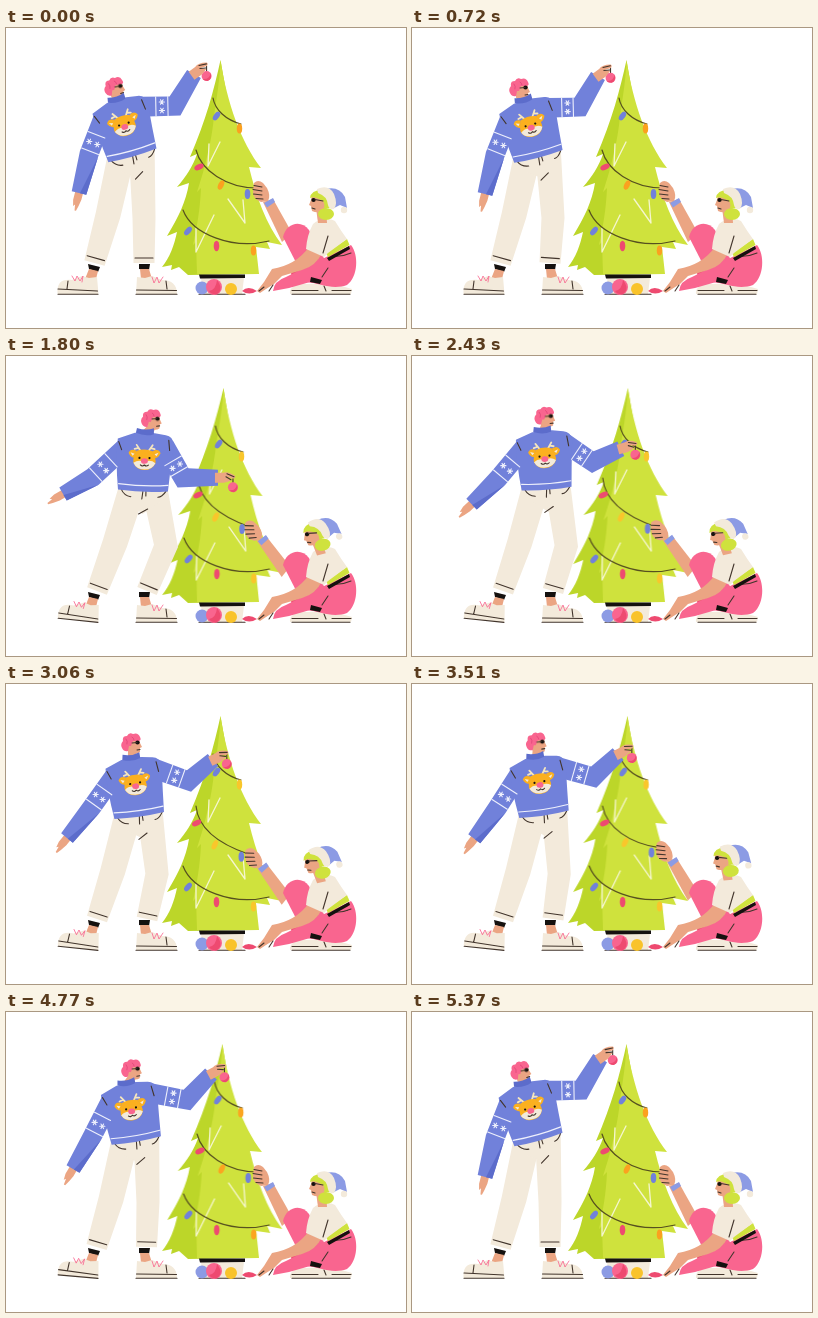
Recreate the animation shown at these times as an HTML page. Size 400 px wide and 300 px high, loop 5400 ms.

```html
<!DOCTYPE html>
<html lang="en">
<head>
<meta charset="utf-8">
<title>Decorating the tree</title>
<style>
  html, body { margin: 0; width: 100%; height: 100%; overflow: hidden; background: #fff; }
  svg { display: block; width: 100%; height: 100%; }
  path, ellipse, circle { stroke-linejoin: round; stroke-linecap: round; }
  .skin { fill: #eba583; }
  .cream { fill: #f3eadb; }
  .blue { fill: #7181da; }
  .sky { fill: #8c9be4; }
  .shade { fill: #5c6ccb; }
  .pink { fill: #f9658f; }
  .lime { fill: #cfe23d; }
  .leaf { fill: #bcd629; }
  .gold { fill: #fbb01f; }
  .red { fill: #ee4a70; }
  .ink { fill: #15110f; }
  .line { fill: none; stroke: #42352c; stroke-width: 1.1; }
  .snow { fill: none; stroke: #eef0fc; stroke-width: 1.1; }
  .wire { fill: none; stroke: #56501f; stroke-width: 1.2; }
  .scribble { fill: none; stroke: #f5f6cf; stroke-width: 1.3; }
  .lace { fill: none; stroke: #f9658f; stroke-width: .8; }

  #tree { transform-origin: 214px 247px; animation: sway 5.4s ease-in-out infinite; }
  @keyframes sway {
    0%, 20%, 56%, 100% { transform: skewX(0); }
    33% { transform: skewX(-.8deg); }
    74%, 90% { transform: skewX(-.5deg); }
  }
  .glow { animation: glow 5.4s linear infinite; }
  @keyframes glow {
    0%, 22%, 90%, 100% { fill: #fba11f; }
    33%, 74% { fill: #f9c62b; }
  }
  #eye { animation: blink 5.4s infinite step-end; }
  @keyframes blink {
    0%, 78% { opacity: 1; }
    72% { opacity: 0; }
  }
</style>
</head>
<body>
<svg viewBox="0 0 400 300">
  <g id="tree">
    <path class="leaf" d="M214.500 32C208 62 200 92 184 129L191 126C187 138 180 149 171 159L183 155C180 174 172 190 161 208L171 204C168 218 164 229 156 239L166 237L165 242L173 239L182 247L252 246Z"/>
    <path class="lime" d="M214.500 32C221 75 235 114 255 140L243 139C250 168 260 196 276 217L261 214L264 221L250 219L253 246H191L190 214L187 217C191 199 194 182 195 160L191 164C199 140 206 112 208 88C211 68 214 50 214.500 32Z"/>
    <path class="scribble" d="M203 116L202 138L214 114M222 171L239 195L237 172M190 200L190 224L208 187"/>
    <path class="wire" d="M207 70C209 82 220 92 235 96M177 182C186 206 226 222 263 213"/>
    <path class="wire" id="string"/>
    <ellipse class="blue" cx="210.500" cy="88" rx="2.800" ry="5" transform="rotate(35 210.500 88)"/>
    <ellipse class="glow" cx="233.500" cy="100.500" rx="2.700" ry="5"/>
    <ellipse class="blue" cx="182" cy="203" rx="2.800" ry="5" transform="rotate(40 182 203)"/>
    <ellipse class="red" cx="210.500" cy="218" rx="2.800" ry="5.200"/>
    <ellipse class="glow" cx="247.500" cy="222.500" rx="2.700" ry="5"/>
    <ellipse class="red" id="bulb0" rx="2.700" ry="5"/>
    <ellipse class="glow" id="bulb1" rx="2.700" ry="5"/>
    <ellipse class="blue" id="bulb2" rx="2.800" ry="5"/>
  </g>

  <path class="cream" d="M195 250H238L236 266H197Z"/>
  <path class="ink" d="M193 246.500H239V250L194 250.500Z"/>
  <path class="line" d="M193 266.300H239"/>
  <circle class="sky" cx="196" cy="260" r="6.500"/>
  <circle class="pink" cx="208" cy="259" r="8"/>
  <path class="red" d="M203 263Q210 262 211 252Q218 261 211 266Q206 267 203 263Z"/>
  <circle cx="225" cy="261" r="6" fill="#f9c32b"/>
  <path class="red" d="M236 263Q242 257 251 263Q243 268 236 263Z"/>

  <g id="woman">
    <g id="backArm">
      <path class="skin" d="M257 174L267 171L286 205L276 214Z"/>
      <path class="skin" d="M248 155Q252 151 257 155L261 160Q265 168 262 173L255 174Q247 171 247 164Z"/>
      <path class="line" d="M248 157.500L256 159M247 161.500L256 163M247.500 166L256 167M250 170.500L257 171"/>
      <path class="sky" d="M258 175L267 170L269 174L261 179.500Z"/>
    </g>
    <path class="pink" d="M277 209C280 195 295 191 303 202L321 236L314 256L300 254Z"/>
    <path class="red" d="M284 238L306 240L304 252L286 251Z"/>
    <path class="cream" d="M284 266C283 259 291 255 300 256L325 255L346 261L345 266Z"/>
    <path class="line" d="M286 262.500H312M286 266.300H344M318 258L320 263M326 262.500H345"/>
    <path class="pink" d="M267 263Q268 253 280 249L312 233L345 217C353 227 352 249 341 257C327 262 314 256 304 254L283 260Z"/>
    <path class="ink" d="M305 249L316 252L314 256L304 254Z"/>
    <path class="line" d="M345 225Q336 229 327 228M322 240L316 249M295 233L311 231"/>
    <path class="skin" d="M303 219L316 225Q310 238 296 242L276 248L268 256L260 261L254 265L251 263L258 254L266 241Q290 237 303 219Z"/>
    <path class="line" d="M253 263L258 259M267 257L263 263"/>
    <path class="ink" d="M321 230L343 218L344 221L323 233Z"/>
    <path class="lime" d="M320 225L341 211L343.500 217L322 229Z"/>
    <path class="cream" d="M307 196C313 190 324 190 329 193Q335 203 341 211L322 225L318 229L300 221Q301 207 307 196Z"/>
    <path class="line" d="M322 208L317 225"/>
    <g id="womanHead">
      <path class="skin" d="M310 180L320 178L321 195L312 195Z"/>
      <path class="skin" d="M306 167L319 166L321 179Q314 187 306 183L305 178L303 177L305 172Z"/>
      <path class="lime" d="M304 170Q305 162 316 162L324 168L324 180L318 180Q320 173 313 171Q308 168 304 170Z"/>
      <ellipse class="lime" cx="320" cy="186" rx="8" ry="6"/>
      <path class="sky" d="M320 161Q333 158 339 169L341 180L334 177L326 181Z"/>
      <path class="cream" d="M311 161Q323 156 328 166Q332 176 328 181Q323 182 322 177Q321 168 312 165Z"/>
      <circle class="cream" cx="338" cy="182" r="3.200"/>
      <ellipse class="ink" cx="307.500" cy="172" rx="2.200" ry="2"/>
      <path class="line" d="M309 171.500L317 173M306 180L309 181"/>
    </g>
  </g>

  <g id="man">
    <path class="ink" d="M82 236L94 239L92 244L83 241ZM133 236L144 236L143 242L133 241Z"/>
    <path class="skin" d="M83 241L92 243L90 251H79ZM134 241L143 241L146 251H135Z"/>
    <g id="leftFoot">
      <path class="cream" d="M51.500 266C51 255 55 251 66 252L76 248L83 250L91 249L92.500 266Z"/>
      <path class="line" d="M52 261L91.500 263M52 266.300H92M62 253L61 261"/>
      <path class="lace" d="M66 248L69 253L71 248L74 253L77 248L76 254"/>
    </g>
    <path class="cream" d="M130 266L131 249L139 250L146 248L156 252C165 252 171 256 171 266Z"/>
    <path class="line" d="M130.500 262L170.500 262.500M130 266.300H171M160 253L161 261"/>
    <path class="lace" d="M146 249L148 255L151 249L153 255L157 249"/>
    <path class="cream" id="leftLeg"/>
    <path class="cream" id="rightLeg"/>
    <path class="cream" id="seat"/>
    <path class="line" id="cuffs"/>
    <path class="skin" id="neck"/>
    <g id="head">
      <path class="skin" d="M-4 -5L7 -5L8 -1L10 3L8 4L8 8Q4 11 -4 8Z"/>
      <path class="pink" d="M-10 4Q-12 0 -9 -3Q-10 -8 -5 -8Q-3 -12 1 -10Q6 -12 8 -7Q10 -3 6 -3L1 -3L-1 2L-3 2L-4 7Q-8 8 -10 4Z"/>
      <path d="M-6 -5Q-4 -3 -5 0M0 -7Q2 -6 2 -4" fill="none" stroke="#e04579" stroke-width=".8"/>
      <g id="eye"><ellipse class="ink" cx="5.500" cy="-1.500" rx="2.200" ry="2"/><path class="line" d="M0 -1L5 -1.500"/></g>
      <path class="line" d="M5 6L8 5.500"/>
    </g>
    <path class="skin" id="leftHand" d="M-2 -4L6 -4Q13 -3 18 -1.500L18 0L12 1L14 2.500L8 4L-2 4Z"/>
    <path class="blue" id="leftArm"/>
    <path class="shade" id="leftShade"/>
    <path class="blue" id="rightArm"/>
    <g id="torso">
      <path class="line" d="M-22 0Q-19 7 -12 8M23 2Q19 8 15 8M0 2L-1 10M3 2L3 7M-4 25L5 20"/>
      <path class="blue" d="M-9 -56L-26 -50Q-28 -28 -25 1Q0 4 25 2L27 -18L30 -45Q29 -53 22 -54L11 -56Z"/>
      <path class="shade" d="M-7 -61Q2 -58 10 -61L10 -55Q2 -52 -8 -56Z"/>
      <path class="snow" d="M-24.500 -5Q0 -2 25 -4"/>
      <path class="line" d="M-25 -47L-22 -39M25 -49L26 -39"/>
      <g transform="translate(1 -30)">
        <path d="M-4 -8L-8 -14M-6 -11L-10 -10M4 -8L8 -14M6 -11L10 -10" fill="none" stroke="#f6e6bd" stroke-width="1.800"/>
        <path class="gold" d="M-8 -8Q-14 -11 -16 -6Q-14 -1 -10 -1ZM8 -8Q14 -11 16 -6Q14 -1 10 -1Z"/>
        <path class="cream" d="M-10 -5L-14 -6.500L-12 -3ZM10 -5L14 -6.500L12 -3Z"/>
        <path class="gold" d="M-8 -8Q0 -11 8 -8Q12 0 11 4Q8 11 0 11Q-8 11 -11 4Q-12 0 -8 -8Z"/>
        <path class="cream" d="M-11 4Q-6 0 0 3Q6 0 11 4Q8 10.500 0 10.500Q-8 10.500 -11 4Z"/>
        <circle class="ink" cx="-5" cy="-1" r="1.100"/><circle class="ink" cx="5" cy="-1" r="1.100"/>
        <ellipse class="pink" cy="2" rx="3.500" ry="2.800"/>
        <path class="line" d="M-4 6Q-2 8 0 6Q2 8 4 6"/>
      </g>
    </g>
    <g id="bauble">
      <path class="line" d="M0 -10V-5"/>
      <circle class="pink" r="5"/>
      <path class="red" d="M-4 3Q3 4 4 -3Q6 3 1 5Q-2 5 -4 3Z"/>
    </g>
    <g id="rightHand">
      <path class="skin" d="M-3 -5L5 -5Q10 -7 17 -2Q18 0 15 1L9 -1L13 3L6 5L-3 5Z"/>
      <path class="line" d="M9 -4L16 -1M8 -1L13 2"/>
    </g>
    <path class="snow" id="bands"/>
  </g>
</svg>
<script>
const LOOP = 5400;
const $ = id => document.getElementById(id);
const set = (id, d) => $(id).setAttribute('d', d);
const move = (id, transform) => $(id).setAttribute('transform', transform);
const mix = (a, b, k) => a + (b - a) * k;

// hem x, y, tilt | head x, y, tilt | left elbow, wrist | right elbow, wrist | right knee x | foot tilt
const start = [126, 126, -17, 109, 60, -6, 83, 126, 73, 165, 169, 78, 188, 46, 138, 0];
const reach = [126, 124, -17, 110, 58, -10, 82, 125, 72, 164, 171, 70, 190, 33, 138, 0];
const dip = [126, 127, -16, 108, 61, 0, 83, 127, 73, 166, 168, 79, 186, 48, 141, 0];
const low = [137, 133, 1, 146, 64, 3, 87, 121, 57, 138, 177, 122, 212, 122, 160, 6];
const mid = [133, 130, -9, 126, 60, 0, 86, 123, 61, 154, 183, 97, 207, 76, 151, 6];
const hang = [130, 127, -11, 123, 58, 0, 86, 123, 64, 156, 180, 88, 205, 62, 142, 6];
const rest = [130, 127, -11, 126, 58, 2, 87, 123, 67, 157, 181, 88, 205, 62, 142, 5];

const poses = [[0, start], [340, reach], [720, dip], [940, reach], [1750, low], [2900, mid],
  [3100, mid], [4020, hang], [4450, hang], [4770, rest], [LOOP, start]];
const leans = [[0, [0]], [1150, [0]], [1700, [1]], [3100, [.95]], [3800, [0]], [LOOP, [0]]];

function sample(track, t) {
  const i = track.findIndex(key => key[0] > t);
  const [t0, a] = track[i - 1], [t1, b] = track[i];
  const u = (t - t0) / (t1 - t0), k = u * u * (3 - 2 * u);
  return a.map((v, n) => mix(v, b[n], k));
}

const fmt = p => p.map(v => v.toFixed(2)).join(' ');
const poly = points => `M${points.map(fmt).join('L')}Z`;
const dir = (a, b) => {
  const x = b[0] - a[0], y = b[1] - a[1], d = Math.hypot(x, y);
  return [x / d, y / d];
};
const angle = (a, b) => Math.atan2(b[1] - a[1], b[0] - a[0]) * 180 / Math.PI;
const off = (p, d, w) => [p[0] - d[1] * w, p[1] + d[0] * w];

// Both edges of a tapered three-point limb, mitred at the joint
function edges([a, b, c], [wa, wb, wc]) {
  const d1 = dir(a, b), d2 = dir(b, c);
  const m = dir([0, 0], [d1[0] + d2[0], d1[1] + d2[1]]);
  const miter = 1 / (m[0] * d1[0] + m[1] * d1[1]);
  return [1, -1].map(s => [off(a, d1, s * wa / 2), off(b, m, s * wb / 2 * miter), off(c, d2, s * wc / 2)]);
}
function limb(points, widths) {
  const [l, r] = edges(points, widths);
  return poly([...l, ...r.reverse()]);
}

function flake([x, y]) {
  return [0, 60, 120].map(deg => {
    const c = 2.6 * Math.cos(deg * Math.PI / 180), s = 2.6 * Math.sin(deg * Math.PI / 180);
    return `M${fmt([x - c, y - s])}L${fmt([x + c, y + s])}`;
  }).join('');
}
function band(a, b, from, to, w) {
  const d = dir(a, b), at = k => [mix(a[0], b[0], k), mix(a[1], b[1], k)];
  const stripe = k => `M${fmt(off(at(k), d, w / 2))}L${fmt(off(at(k), d, -w / 2))}`;
  const mid = at((from + to) / 2);
  return stripe(from) + stripe(to) + flake(off(mid, d, 4.3)) + flake(off(mid, d, -4.3));
}

function drawMan(t) {
  const [hx, hy, tilt, headX, headY, headTilt, elx, ely, wlx, wly, erx, ery, wrx, wry, knee, foot] = sample(poses, t);
  const cos = Math.cos(tilt * Math.PI / 180), sin = Math.sin(tilt * Math.PI / 180);
  const body = (x, y) => [hx + x * cos - y * sin, hy + x * sin + y * cos];
  const lift = foot / 6;

  move('torso', `translate(${hx} ${hy}) rotate(${tilt})`);
  move('head', `translate(${headX} ${headY}) rotate(${headTilt})`);
  move('leftFoot', `rotate(${foot} 91 266)`);
  set('neck', limb([[headX, headY + 3], [headX, headY + 7], body(2, -55)], [8, 8, 9]));

  const hipL = body(-10, -3), hipR = body(11, -3);
  const ankleL = [mix(88.5, 91, lift), 235], ankleR = [mix(138, 141, lift), 235];
  const kneeL = [(hipL[0] + ankleL[0]) / 2, 187], kneeR = [knee, 190];
  set('leftLeg', limb([hipL, kneeL, ankleL], [27, 25, 21]));
  set('rightLeg', limb([hipR, kneeR, ankleR], [26, 23, 21]));
  set('seat', poly([body(-22, -3), body(23, -3), body(16, 14), body(0, 25), body(-15, 14)]));
  set('cuffs', [[kneeL, ankleL], [kneeR, ankleR]].map(([k, a]) => {
    const d = dir(k, a), p = [a[0] - d[0] * 5, a[1] - d[1] * 5];
    return `M${fmt(off(p, d, 9))}L${fmt(off(p, d, -9))}`;
  }).join(''));

  const shL = body(-18, -42), elL = [elx, ely], wrL = [wlx, wly];
  const sleeveL = [shL, elL, wrL], widthL = [19, 19, 15];
  set('leftArm', limb(sleeveL, widthL));
  const inner = edges(sleeveL, widthL)[1];
  set('leftShade', poly([inner[1], inner[2], off(wrL, dir(elL, wrL), -1)]));
  move('leftHand', `translate(${fmt(wrL)}) rotate(${angle(elL, wrL)})`);

  const shR = body(21, -43), elR = [erx, ery], wrR = [wrx, wry];
  set('rightArm', limb([shR, elR, wrR], [20, 19, 16]));
  set('bands', band(shL, elL, .45, .92, 18) + band(shR, elR, .46, .8, 19));

  const turn = angle(elR, wrR) * .6, rad = turn * Math.PI / 180;
  move('rightHand', `translate(${fmt(wrR)}) rotate(${turn})`);
  move('bauble', `translate(${fmt([wrx + 13 * Math.cos(rad) + 2, wry + 13 * Math.sin(rad) + 9.5])})`);
}

function drawWoman(t) {
  const [k] = sample(leans, t);
  move('backArm', `translate(${-k} ${6.5 * k}) rotate(${-9 * k} 280 210)`);
  move('womanHead', `translate(${-k} ${2 * k}) rotate(${-14 * k} 322 196)`);
  set('string', `M190 122C${mix(195, 192, k)} ${mix(142, 145, k)} ${mix(220, 212, k)} 160 ${mix(251, 243, k)} ${mix(160, 171, k)}`);
  move('bulb0', `translate(${mix(193, 190.5, k)} 139) rotate(65)`);
  move('bulb1', `translate(${mix(215, 208.5, k)} ${mix(157, 161, k)}) rotate(25)`);
  move('bulb2', `translate(${mix(241.5, 235, k)} ${mix(166, 173, k)})`);
}

function frame() {
  const t = performance.now() % LOOP;
  drawMan(t);
  drawWoman(t);
  requestAnimationFrame(frame);
}
frame();
</script>
</body>
</html>
```
